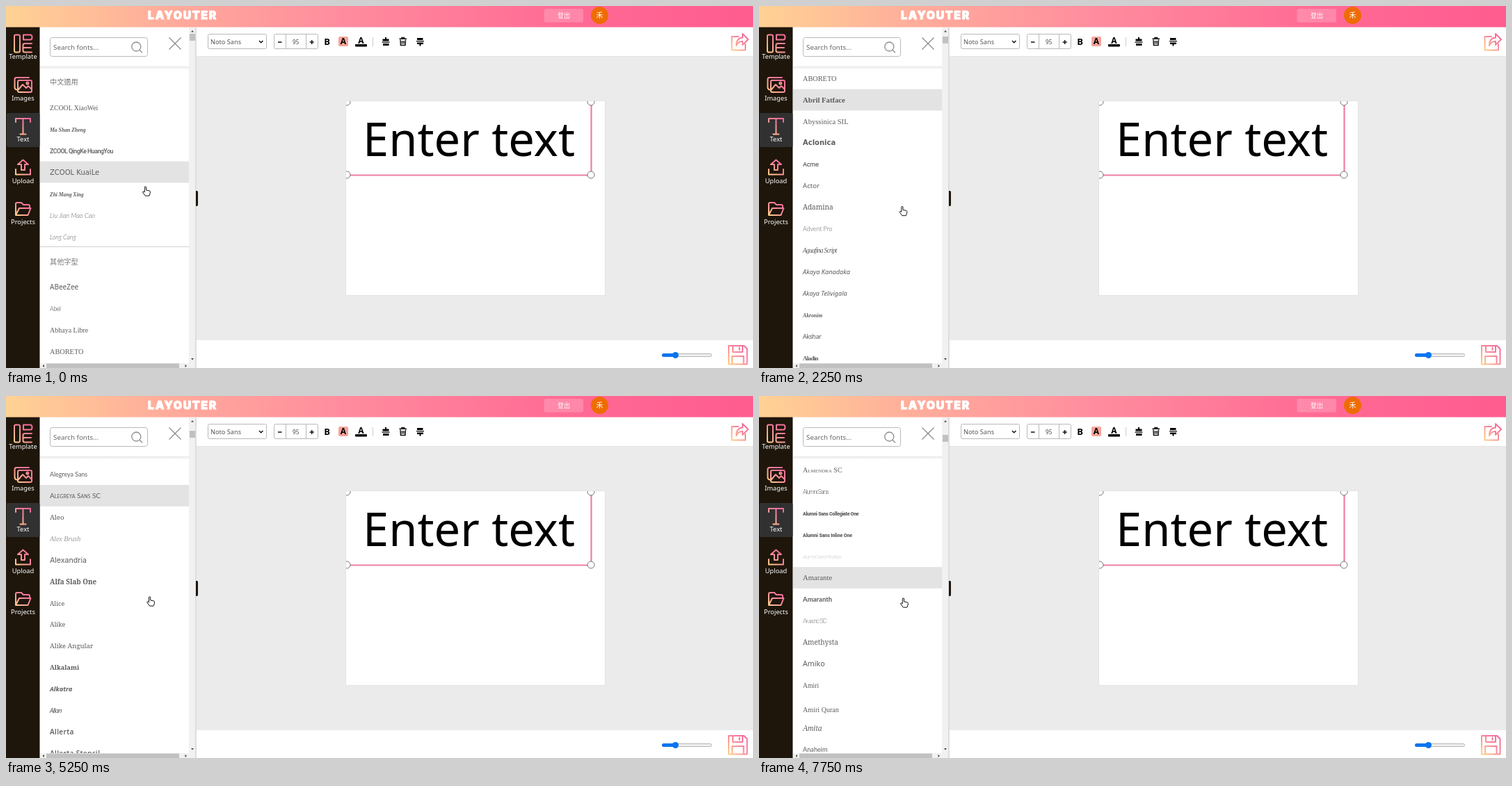
These frames come from a looping animation (1074 by 521 pixels, 8 s). An HTML page:

```html
<!DOCTYPE html>
<html lang="en">
<head>
<meta charset="utf-8">
<title>Font picker</title>
<style>
html, body { margin: 0; width: 100%; height: 100%; overflow: hidden; background: #fff; }
svg { display: block; width: 100%; height: 100%; }
text { font-family: "Noto Sans", "Noto Sans CJK TC", "Noto Sans CJK", sans-serif; }
.mid { text-anchor: middle; }
.side text { font-size: 9.3px; fill: #fff; text-anchor: middle; }
.line { fill: none; stroke: url(#warm); stroke-width: 2; stroke-linejoin: round; stroke-linecap: round; }
.box { fill: #fff; stroke: #b9b9b9; }
.ink { fill: none; stroke: #111; stroke-width: 1.5; }
.knob { fill: #fff; stroke: #777; }
.head { font-size: 10.2px; fill: #777; }
</style>
</head>
<body>
<svg viewBox="0 0 1074 521" preserveAspectRatio="none">
  <defs>
    <linearGradient id="bar"><stop offset="0" stop-color="#ffd294"/><stop offset=".2" stop-color="#ffae9b"/><stop offset=".45" stop-color="#ff8c9e"/><stop offset=".75" stop-color="#ff6a94"/><stop offset="1" stop-color="#ff5c90"/></linearGradient>
    <linearGradient id="warm" x1="0" y1="1" x2="1" y2="0"><stop offset="0" stop-color="#ffd08a"/><stop offset=".6" stop-color="#f77f9b"/><stop offset="1" stop-color="#f4689a"/></linearGradient>
    <linearGradient id="fade" x2="0" y2="1"><stop offset="0" stop-color="#000" stop-opacity=".06"/><stop offset="1" stop-color="#000" stop-opacity="0"/></linearGradient>
    <clipPath id="listClip"><path d="M49 88H263V514H49z"/></clipPath>
    <clipPath id="pageClip"><path d="M489 137H861V416H489z"/></clipPath>
  </defs>
  <rect width="1074" height="521" fill="#fff"/>

  <!-- work area -->
  <path d="M274 73H1074V481H274z" fill="#ebebeb"/>
  <path d="M274 72.5H1074" stroke="#e4e4e4"/>
  <path d="M488.5 136.5H861.5V416.5H488.5z" fill="#fff" stroke="#e4e4e4"/>
  <g clip-path="url(#pageClip)">
    <text x="513" y="216" font-size="66.8">Enter text</text>
    <path d="M489 243.5H841.5V137" fill="none" stroke="#ee7ea2" stroke-width="2.2"/>
    <circle class="knob" cx="490" cy="138" r="5"/><circle class="knob" cx="841" cy="138" r="5"/>
    <circle class="knob" cx="490" cy="243" r="5"/><circle class="knob" cx="841" cy="243" r="5"/>
  </g>

  <!-- toolbar -->
  <rect class="box" x="290.5" y="40.5" width="84" height="21" rx="2"/>
  <text x="294" y="54.5" font-size="9.2" fill="#555">Noto Sans</text>
  <path class="ink" d="M364 50l2.7 2.7 2.7-2.7" stroke-width="1.2"/>
  <rect class="box" x="385.5" y="40.5" width="63" height="21" rx="2"/>
  <path d="M402.5 41v20M431.5 41v20" stroke="#b9b9b9"/>
  <path class="ink" d="M391 52h5.5M436.7 52h6M439.7 49v6"/>
  <text class="mid" x="416.7" y="55" font-size="8" fill="#444">95</text>
  <g font-weight="700" class="mid">
    <text x="461.7" y="56" font-size="13" font-weight="800">B</text>
    <rect x="478" y="44" width="14" height="14" rx="2" fill="#f5a59b"/>
    <text x="485" y="55.3" font-size="12">A</text>
    <text x="510.3" y="53.5" font-size="12">A</text>
  </g>
  <rect x="502" y="55" width="17" height="3.5" rx="1"/>
  <path d="M527.5 45v13" stroke="#ccc"/>
  <path d="M545 45h2v2.5h3.5v3h-9v-3h3.5zM540.5 51.5h11v1.3h-11zM542 54h8.5v3h-8.5z"/>
  <path class="ink" d="M565.5 47.3h10.5M569 47v-1.5h3.5V47M567 48.5l.5 8h6.5l.5-8M569.5 50v4.5M572 50v4.5" stroke-width="1.3"/>
  <path d="M591 46h8.5v3H591zM590 50h11v1.3h-11zM591 52.5h9v2.5h-3.5v2.5h-2V55H591z"/>
  <path class="line" d="M1053 44h-9.5v19.5H1063V55M1050 57q0-11 9-11.5V40l8 8-8 8v-5q-6-.5-9 6z"/>

  <!-- bottom controls -->
  <rect x="943.5" y="500.5" width="71" height="4" rx="2" fill="#efefef" stroke="#b5b5b5"/>
  <rect x="943" y="500" width="20" height="5" rx="2.5" fill="#0a75f0"/>
  <circle cx="962.5" cy="502.5" r="4.5" fill="#0a75f0"/>
  <path class="line" d="M1039 489h22l4.5 4.5v22H1039zM1045 489v9h14v-9M1054.5 491.5v3.500M1044 515v-11h16.500v11"/>

  <!-- font panel -->
  <g clip-path="url(#listClip)">
    <g id="list">
      <rect id="hover" x="49" width="214" height="30.8" fill="#e3e3e3"/>
      <text class="head" x="63" y="112.7">中文適用</text>
      <text class="head" x="63" y="371.9">其他字型</text>
      <path d="M49 346.5H263" stroke="#d0d0d0"/>
    </g>
    <path d="M49 88H263V92H49z" fill="url(#fade)"/>
  </g>
  <path d="M49 87.5H263" stroke="#e6e6e6"/>
  <rect class="box" x="63.5" y="45.5" width="140" height="27" rx="3"/>
  <text x="68" y="62.7" font-size="9.8" fill="#666">Search fonts...</text>
  <g fill="none" stroke="#8c8c8c" stroke-width="1.3">
    <circle cx="187.3" cy="58.5" r="6.5"/>
    <path d="M192 63.3l4 4M234.5 45.5l17 17M251.5 45.5l-17 17"/>
  </g>
  <path d="M263 31H273V521H263zM49 514H263V521H49z" fill="#f1f1f1"/>
  <rect id="thumb" x="264" y="40" width="8" height="10" fill="#c1c1c1"/>
  <rect x="58" y="514.5" width="191" height="6.5" fill="#c1c1c1"/>
  <path d="M266 37.5l2-2.5 2 2.5zM266 507l2 2.5 2-2.5zM55 516l-2.5 2 2.5 2zM257.5 516l2.5 2-2.5 2z" fill="#444"/>
  <path d="M273 31V521" stroke="#c4c4c4"/>
  <path d="M273 266h1.500q1.500 0 1.500 2v18q0 2-1.500 2H273z" fill="#1e160b"/>

  <!-- sidebar -->
  <g class="side">
    <path d="M0 30H48.5V521H0z" fill="#1e160b"/>
    <rect x="1" y="154" width="47.5" height="49" rx="2" fill="#313131"/>
    <path class="line" d="M14 41.500h4q2 0 2 2v21q0 2-2 2h-4q-2 0-2-2v-21q0-2 2-2zM25 41.500h10q2.500 0 2.500 3.500t-2.500 3.500H25zM37 54H27q-2.500 0-2.500 2.500v7.500q0 2.500 2.500 2.500h10M26 60h10"/>
    <text x="24.5" y="75.7">Template</text>
    <path class="line" d="M19 107h16q2 0 2 2v13q0 2-2 2H19q-2 0-2-2v-13q0-2 2-2zM33 103H15q-2.500 0-2.500 2.500V117q0 3 3 3.500M18 120l6-7 5 5 3-3 5 5"/>
    <circle class="line" cx="31" cy="111" r="1.500"/>
    <text x="24.5" y="135.5">Images</text>
    <path class="line" d="M14 167v-5h21v5M24.500 162v22M20.500 184.500h8"/>
    <text x="24.5" y="194.9">Text</text>
    <path class="line" d="M22 236v-8h-5l7.500-6.500 7.500 6.500h-5v8zM14 235v7.500h21V235"/>
    <text x="24.5" y="254.5">Upload</text>
    <path class="line" d="M14 300v-15q0-2 2-2h6l3 3h7q2 0 2 2v3M14 301l5-10h16.500l-4 10z"/>
    <text x="24.5" y="313.9">Projects</text>
  </g>

  <!-- top bar -->
  <path d="M0 0H1074V30.5H0z" fill="url(#bar)"/>
  <text x="204" y="19" font-size="15.8" letter-spacing="1.7" fill="#fff" stroke="#fff" stroke-width=".9" stroke-linejoin="round" style="font-family:Inter,sans-serif;font-weight:900">LAYOUTER</text>
  <rect x="773.5" y="4" width="56.5" height="19.5" rx="3" fill="#fff" fill-opacity=".2"/>
  <text class="mid" x="802" y="17" font-size="9" fill="#fff">登出</text>
  <circle cx="853.5" cy="13.5" r="12.5" fill="#ef6c00"/>
  <text class="mid" x="853.5" y="17.3" font-size="10" fill="#fff">禾</text>

  <path id="hand" fill="#fff" stroke="#111" stroke-linejoin="round" d="M-1.200 1a1.100 1.100 0 0 1 2.200 0v4l4.500 .9q1.600 .4 1.400 2l-.6 3-1 2.300h-5.500l-3.200-4.300q-1-1.300 0-1.900 .9-.4 2.200 .9z"/>
</svg>
<script>
const families = {
  s: 'Liberation Serif, serif', S: 'Noto Serif, serif', a: 'Liberation Sans, sans-serif',
  n: 'Noto Sans, sans-serif', o: 'Open Sans, sans-serif', l: 'Lato, sans-serif',
  r: 'Roboto, sans-serif', i: 'Inter, sans-serif', d: 'DejaVu Sans, sans-serif'
};
// name | family, weight, i = italic, c = small caps | size | letter spacing | colour
const chinese = `ZCOOL XiaoWei|s4|9.8
Ma Shan Zheng|s7i|7.7
ZCOOL QingKe HuangYou|r5|8.8|-.5
ZCOOL KuaiLe|d4|10
Zhi Mang Xing|s7i|7.6
Liu Jian Mao Cao|l3i|9.3
Long Cang|l3i|8.8`;
const others = `ABeeZee|n4|10
Abel|r3|9|-.4
Abhaya Libre|s4|10
ABORETO|s4|10.3
Abril Fatface|s7|10.7
Abyssinica SIL|s4|10.6
Aclonica|d7|10
Acme|o6|9|-.3
Actor|n4|9.6
Adamina|S4|10.1
Advent Pro|l3|8.8
Aguafina Script|s4i|9.5|-.75
Akaya Kanadaka|n5i|9.2
Akaya Telivigala|n5i|9
Akronim|s7i|7.7
Akshar|n4|9|-.5
Aladin|s7|9|-.7
Alata|n4|10.5
Alatsi|l7|9.5
Albert Sans|i4|9.5
Aldrich|d4|10.4
Alef|n4|10.4
Alegreya|s4|9.6
Alegreya SC|s4c|9.9
Alegreya Sans|l4|8.9
Alegreya Sans SC|l4c|10
Aleo|S4|9.7
Alex Brush|s4i|10|0|#999
Alexandria|i4|10.6
Alfa Slab One|S9|9.8
Alice|S4|9
Alike|S4|9.2
Alike Angular|S4|9.5
Alkalami|S6|9.1
Alkatra|n6i|9.2
Allan|n5i|9.5|-.9
Allerta|o6|10.2|.3
Allerta Stencil|o6|10.2|.3
Allison|s4i|8|-.3|#999
Allura|s4i|10|0|#888
Almarai|a4|10
Almendra|s4i|10.4
Almendra Display|s4|10.4|0|#ccc
Almendra SC|s4c|10
Alumni Sans|r3|8.5|-.9
Alumni Sans Collegiate One|r9|7|-.3
Alumni Sans Inline One|r9|7|-.12
Alumni Sans Pinstripe|r1|8|-.95|#aaa
Amarante|s4|10.7
Amaranth|l7|9.6
Amatic SC|r3c|9.5|-1.2|#888
Amethysta|S4|10
Amiko|n4|10.7
Amiri|s4|9.7
Amiri Quran|s4|10.1
Amita|s4i|11.5
Anaheim|l4|9.2`;

const $ = id => document.getElementById(id);
const list = $('list'), hover = $('hover'), thumb = $('thumb'), hand = $('hand');
const rowY = i => i < 0 ? 363 + 31 * i : 404.4 + 30.92 * i;

function addRows(rows, first) {
  rows.split('\n').forEach((row, i) => {
    const [name, look, size, gap = 0, color = '#5c5c5c'] = row.split('|');
    const text = document.createElementNS('http://www.w3.org/2000/svg', 'text');
    const nudge = name === 'Amiri Quran' ? 4 : 0;
    text.textContent = name;
    text.setAttribute('x', 63);
    text.setAttribute('y', rowY(first + i) + 3.5 + nudge);
    text.style.cssText = `font-family:${families[look[0]]};font-weight:${look[1]}00;` +
      `font-size:${size}px;letter-spacing:${gap}px;fill:${color};` +
      (look[2] === 'i' ? 'font-style:italic;' : '') +
      (look[2] === 'c' ? 'font-variant:small-caps;' : '');
    list.append(text);
  });
}
addRows(chinese, -7);
addRows(others, 0);

const STEP = 250, LOOP = 8000;
const scroll = [
  0, 20, 60, 100, 116, 168.5, 215, 240, 310, 393, 405, 460, 550, 630, 685, 750,
  820, 870, 890, 890, 950, 1034, 1110, 1136, 1210, 1292, 1360, 1390, 1460, 1540, 1601, 1627
];
// [step, hovered row]; the highlight lags behind while the wheel turns
const hovers = [[0, -4], [4, 0], [7, 4], [10, 9], [20, 25], [23, 33], [27, 41], [30, 48]];
// [step, x, y] of the fingertip
const tips = [[0, 200.5, 260], [1, 204, 279], [2, 206, 288.5], [20, 206.7, 289], [31, 207.5, 291]];
const latest = (keys, step) => keys.filter(k => k[0] <= step).pop();

function draw(now) {
  const step = Math.floor(now % LOOP / STEP);
  const y = scroll[step];
  const [, x, tipY] = latest(tips, step);
  list.setAttribute('transform', `translate(0 ${-y})`);
  hover.setAttribute('y', rowY(latest(hovers, step)[1]) - 15.4);
  thumb.setAttribute('y', 40 + y * .0098);
  hand.setAttribute('transform', `translate(${x} ${tipY})`);
}
const start = performance.now();
function tick() {
  draw(performance.now() - start);
  requestAnimationFrame(tick);
}
tick();
</script>
</body>
</html>
```
